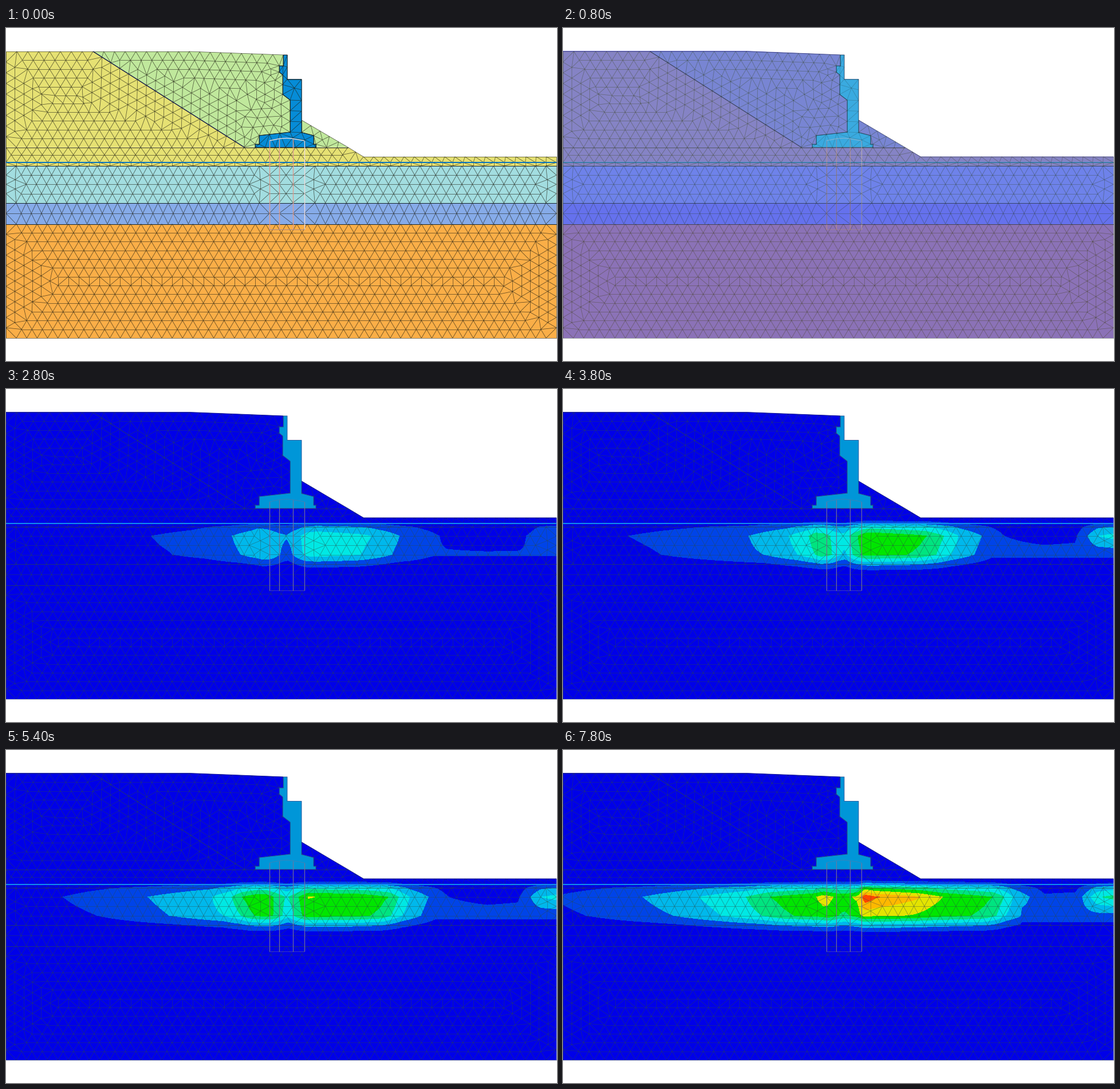
Write a matplotlib script that moves like this. It is 962 px wide and 582 px high and loops after 8 s.

```python
import numpy as np
import matplotlib.pyplot as plt
from matplotlib.animation import FuncAnimation
from matplotlib.collections import LineCollection
from matplotlib.path import Path
from matplotlib.tri import Triangulation

W, H, STEP, FRAMES = 962, 582, 200, 40
DPI = 64  # a power of two keeps the pixel size exact
PX = 72 / DPI  # points per pixel

fig = plt.figure(figsize=(W / DPI, H / DPI), dpi=DPI, facecolor="white")
ax = fig.add_axes([0, 0, 1, 1])
ax.set_xlim(0, W)
ax.set_ylim(H, 0)
ax.axis("off")


def rect(x0, y0, x1, y1):
    return [(x0, y0), (x1, y0), (x1, y1), (x0, y1)]


# Outlines run clockwise on screen.
WALL = [(484, 47), (491, 47), (491, 89.5), (516, 89.5), (516, 182.5), (537, 188),
        (537, 203), (541, 203), (541, 208.5), (435, 208.5), (435, 203), (442, 203),
        (442, 188), (496, 182), (496, 126), (483, 116), (483, 82), (477, 77),
        (477, 66), (484, 66)]
BACK = (WALL[9:] + WALL[:1])[::-1]
FILL = [(152, 41), (320, 41)] + BACK + [(416, 208.5)]
TOE = [(516, 161), (597, 208.5)] + WALL[8:3:-1]
BANK = [(0, 41), (152, 41), (416, 208.5), (0, 208.5)]
BASE = [(0, 208.5), (416, 208.5), (435, 208.5), (541, 208.5), (597, 208.5),
        (624, 225), (961, 225), (961, 235), (0, 235)]
SOIL = ([(0, 40.5), (320, 40.5)] + BACK + WALL[8:3:-1]
        + [(516, 161), (624, 225), (961, 225), (961, 542), (0, 542)])
PILES = [460, 477, 501, 521]

YELLOW, GREEN, CLAY = "#e6e173", "#c0e89c", "#a2dde0"
BLUE, ORANGE = "#86abe9", "#faae47"


def seg_dist(p, a, b):
    """Least distance of each point to the segments a-b."""
    d = b - a
    ap = p[:, None] - a
    t = np.clip((ap * d).sum(2) / (d * d).sum(1), 0, 1)
    return np.hypot(*np.moveaxis(ap - t[..., None] * d, 2, 0)).min(1)


def mesh(poly, row=15.4, size=18):
    """Triangle edges of a mesh that advances in rows from the outline."""
    a = np.array(poly, float)
    b = np.roll(a, -1, 0)
    shape = Path(a)
    rim, inner = [], []
    for k in range(8):
        for p, q in zip(a, b):
            length = np.hypot(*(q - p))
            n = max(1, round(length / size))
            if k == 0:
                rim.extend(p + np.outer(np.arange(n) / n, q - p))
                continue
            s = (np.arange(-1, n + 1) + k % 2 / 2) / n
            normal = np.array([p[1] - q[1], q[0] - p[0]]) / length
            pts = p + np.outer(s, q - p) + k * row * normal
            ok = shape.contains_points(pts) & (seg_dist(pts, a, b) > k * row - 5)
            inner.extend(pts[ok])
    pts = np.array(rim)
    for p in inner:
        if np.hypot(*(pts - p).T).min() > 10.5:
            pts = np.vstack([pts, p])
    tri = Triangulation(*pts.T)
    tri.set_mask(~shape.contains_points(pts[tri.triangles].mean(1)))
    return list(pts[tri.edges])


def soil_mesh():
    cuts = [0] + PILES + [961]
    clay = [rect(x0, 241, x1, 305.5) for x0, x1 in zip(cuts, cuts[1:])]
    deep = [rect(x0, 305.5, x1, 342.5) for x0, x1 in zip(cuts, cuts[1:])]
    edges = []
    for poly, row in ([(BANK, 15.4), (FILL, 15.4), (TOE, 15.4), (BASE, 13),
                       (rect(0, 235, 961, 241), 15), (rect(0, 342.5, 961, 542), 15.35)]
                      + [(c, 16) for c in clay] + [(d, 18.5) for d in deep]):
        edges += mesh(poly, row)
    return edges


SOIL_EDGES = soil_mesh()
model, result = [], []  # (artist, full opacity)


def area(group, poly, color, z):
    patch = plt.Polygon(poly, fc=color, ec="none", lw=0, zorder=z)
    group.append((ax.add_patch(patch), 1))


def lines(group, segs, color, width, z, alpha=1):
    coll = LineCollection(segs, colors=[color], linewidths=width * PX, zorder=z)
    group.append((ax.add_collection(coll), alpha))


tops = [197, 193.5, 193.5, 197]
stems = [[(x, y), (x, 352)] for x, y in zip(PILES, tops)]
cap = [(460, 197), (477, 193.5), (490, 192.5), (501, 193.5), (521, 197)]
foot = [(460, 352), (521, 352)]

# Pressure result
area(result, SOIL, "#0000e8", 1)
area(result, WALL, "#0096d8", 3)
lines(result, SOIL_EDGES, "#2d4a46", 0.7, 4, 0.55)
lines(result, [SOIL[:3], [(516, 161), (624, 225), (961, 225)]], "#000096", 1, 4, 0.8)
lines(result, [WALL + WALL[:1]], "#204890", 1, 4, 0.8)
lines(result, [[(0, 235), (961, 235)]], "#108cf0", 2, 5)
lines(result, stems, "#77739c", 1.3, 6, 0.9)
lines(result, [cap, foot], "#77739c", 0.8, 6, 0.6)

# Soil model
for poly, color in [(BANK, YELLOW), (FILL, GREEN), (TOE, GREEN), (BASE, YELLOW),
                    (rect(0, 235, 961, 241), YELLOW), (rect(0, 241, 961, 305.5), CLAY),
                    (rect(0, 305.5, 961, 342.5), BLUE), (rect(0, 342.5, 961, 542), ORANGE),
                    (WALL, "#068cd7")]:
    area(model, poly, color, 10)
lines(model, SOIL_EDGES + mesh(WALL), "#1c1c10", 0.8, 11, 0.68)
lines(model, [WALL + WALL[:1], [(541, 208.5), (597, 208.5)], [(416, 208.5), (435, 208.5)],
              [(0, 241), (961, 241)], [(0, 305.5), (961, 305.5)],
              [(0, 342.5), (961, 342.5)]], "#10202c", 1, 12, 0.8)
lines(model, [[(152, 41), (416, 208.5)]], "#141a50", 1.2, 12)
lines(model, [[(0, 235), (961, 235)]], "#0874c0", 2, 12)
lines(model, stems[:3], "#dc9c90", 1.4, 13)
lines(model, stems[3:] + [cap], "#ecdcdc", 1.4, 13)
lines(model, [foot], "#b08c84", 1, 13)

# Pressure along the upper clay row; crossings of whole levels left and right
MID = [440, 455, 475, 490, 515, 527, 545, 620]
X = np.arange(0, 962, 3.0)
X[-1] = 961


def profile(left, mid, right, top, valley, end):
    xs = [left[0] - 150] + left + MID + right + [840, 895, 916, 934, 961]
    vs = ([0.3] + list(range(1, len(left) + 1)) + mid
          + [top - i for i in range(len(right))]
          + [valley, valley + 0.1, 0.6 * end, 0.9 * end, end])
    return xs, vs, valley


KEYS = {
    1800: profile([396], [1.3, 1.1, .95, .8, 1, 1.4, 1.55, 1.25], [642], 1, .4, .6),
    3800: profile([115, 325, 395, 430], [4.6, 4.5, 3.6, 3.3, 5, 5.7, 5.8, 5.2],
                  [635, 665, 690, 731, 770], 5, .75, 3.3),
    5400: profile([100, 248, 360, 395, 412], [5.7, 5.6, 4.6, 3.8, 5.2, 6.05, 5.97, 5.7],
                  [668, 685, 704, 737, 772], 5, .78, 3.3),
    6400: profile([30, 190, 305, 365, 393], [5.8, 5.95, 5.3, 4.8, 5.9, 6.7, 6.5, 6.03],
                  [710, 730, 750, 778], 5, 1.0, 3.9),
    7800: profile([-20, 140, 237, 320, 362], [5.9, 6.5, 5.9, 5.7, 6.2, 8.8, 8.1, 7.1],
                  [662, 750, 770, 785, 814], 6, 1.15, 4.3),
}
ROWS = [225, 235, 241, 257, 289, 305, 324]
LEVELS = [1, 2, 3, 4, 5, 6, 7, 8, 20]
COLORS = ["#0044e8", "#00b8ec", "#00e8e4", "#00e480", "#00e600",
          "#e4e400", "#ffb800", "#ff4600"]


def field(xs, vs, valley):
    upper = np.interp(X, xs, vs)
    shift = np.interp(X, [150, 430, 520, 640], [60, 12, 0, -13])
    lower = np.interp(X - shift, xs, vs)
    lower = lower - 0.09 * np.maximum(lower - 3.5, 0) ** 2
    lower = lower - 0.5 * np.exp(-((X - 490) / 18) ** 2)
    floor = valley + 0.5
    lower = np.where(X > 800, floor, np.where(X > 700, np.maximum(lower, floor), lower))
    return np.array([0 * X, 0.3 * upper, 0.6 * upper, upper, lower, 0.45 * lower, 0 * X])


TIMES = [1400] + list(KEYS)
FIELDS = [field(*key) for key in KEYS.values()]
FIELDS.insert(0, 0.6 * FIELDS[0])
bands = []


def pressure(t):
    i = min(np.searchsorted(TIMES, t, side="right"), len(TIMES) - 1)
    s = (t - TIMES[i - 1]) / (TIMES[i] - TIMES[i - 1])
    return (1 - s) * FIELDS[i - 1] + s * FIELDS[i]


def fade(group, amount):
    for artist, alpha in group:
        artist.set_alpha(alpha * amount)
        artist.set_visible(amount > 0)


def draw(i):
    k = min(i / 6, 1)
    fade(model, 1 - k)
    fade(result, k)
    while bands:
        bands.pop().remove()
    t = i * STEP
    if t > 1400:
        bands.append(ax.contourf(X, ROWS, pressure(t), levels=LEVELS,
                                 colors=COLORS, zorder=2))
    return []


anim = FuncAnimation(fig, draw, frames=FRAMES, interval=STEP, init_func=lambda: [],
                     repeat=True, repeat_delay=0, blit=False)
plt.show()
```
